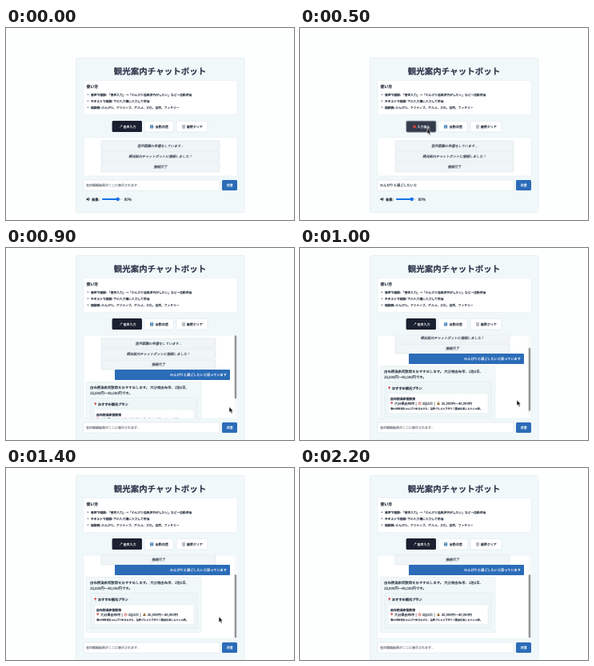
An HTML page that plays this animation: 360 px wide and 240 px high, repeating every 2300 ms.

```html
<!DOCTYPE html>
<html lang="ja">
<head>
<meta charset="utf-8">
<title>観光案内チャットボット</title>
<style>
html, body { margin: 0; width: 100%; height: 100%; overflow: hidden; background: #fdfefe; }
svg { display: block; width: 360px; height: 240px; }
/* The hairline stroke gives the small type its medium weight */
text {
  font-family: "Noto Sans CJK JP", "Noto Sans CJK", "Noto Sans", sans-serif;
  font-size: 4.2px; color: #27303f; fill: currentColor; stroke: currentColor; stroke-width: .14;
  text-rendering: geometricPrecision; white-space: pre;
}
.b { font-weight: 700; }
.title { font-size: 10.5px; color: #2a3347; }
.white { color: #fff; }
.mid { text-anchor: middle; }
.end { text-anchor: end; }
.small text { font-size: 3.78px; }
.btn text { font-size: 4px; }
.field text { font-size: 4.2px; }
.field .hint { font-size: 4px; color: #737a83; }
.card { fill: #fff; stroke: #e1eaee; stroke-width: .5; }
.edge { stroke: #d3dce2; }
.blue { fill: #2b6cb8; }
.sys rect { fill: #f0f5f7; stroke: #d3dde2; stroke-width: .5; }
.sys text { font-style: italic; color: #414b5a; text-anchor: middle; }

/* One loop is 23 steps of 100 ms */
.a { animation: 2.3s step-end infinite; }
.page { animation-name: page; }
.foot { animation-name: foot; }
.panel { animation-name: panel; }
.box { animation-name: box; }
.scroll { animation-name: scroll; }
.thumb { animation-name: thumb; }
.sys rect.a { animation-name: narrow; }
.sys text.a { animation-name: nudge; }
.reply { animation-name: reply; }
.idle { animation-name: idle; }
.rec { animation-name: rec; }
.glow { animation-name: glow; }
.hint { animation-name: hint; }
.say1 { animation-name: say1; }
.say2 { animation-name: say2; }
.say3 { animation-name: say3; }
.say4 { animation-name: say4; }
.send { animation-name: send; }
.pointer { animation-name: pointer; }

@keyframes page { 0% { transform: none; } 39.13%, 100% { transform: translateY(-28px); } }
@keyframes foot { 0% { transform: none; } 39.13%, 100% { transform: translateY(28px); } }
@keyframes panel { 0% { height: 193px; } 39.13%, 100% { height: 249px; } }
@keyframes box { 0% { height: 48px; } 39.13%, 100% { height: 104px; } }
@keyframes scroll {
  0% { transform: none; }
  43.47% { transform: translateY(-20px); }
  47.82%, 100% { transform: translateY(-31px); }
}
@keyframes thumb {
  0% { transform: none; }
  43.47% { transform: translateY(15.5px); }
  47.82%, 100% { transform: translateY(24px); }
}
@keyframes narrow { 0% { width: 148px; } 39.13%, 100% { width: 143px; } }
@keyframes nudge { 0% { transform: none; } 39.13%, 100% { transform: translateX(-2.5px); } }
@keyframes reply { 0% { visibility: hidden; } 39.13%, 100% { visibility: visible; } }
@keyframes idle {
  0% { visibility: visible; }
  13.04% { visibility: hidden; }
  39.13%, 100% { visibility: visible; }
}
@keyframes rec {
  0% { visibility: hidden; }
  13.04% { visibility: visible; }
  39.13%, 100% { visibility: hidden; }
}
@keyframes glow { 0% { fill: #343c4a; } 30.43%, 100% { fill: #464e5c; } }
@keyframes hint {
  0% { visibility: visible; }
  17.39% { visibility: hidden; }
  39.13%, 100% { visibility: visible; }
}
@keyframes say1 { 0% { visibility: hidden; } 17.39% { visibility: visible; } 21.73%, 100% { visibility: hidden; } }
@keyframes say2 { 0% { visibility: hidden; } 21.73% { visibility: visible; } 26.08%, 100% { visibility: hidden; } }
@keyframes say3 { 0% { visibility: hidden; } 26.08% { visibility: visible; } 30.43%, 100% { visibility: hidden; } }
@keyframes say4 { 0% { visibility: hidden; } 30.43% { visibility: visible; } 39.13%, 100% { visibility: hidden; } }
@keyframes send { 0% { fill: #2b6cb8; } 34.78% { fill: #24477a; } 39.13%, 100% { fill: #2b6cb8; } }
@keyframes pointer {
  0% { visibility: hidden; transform: translate(159px, 125.5px); }
  8.69% { visibility: visible; transform: translate(159px, 125.5px); }
  30.43% { visibility: visible; transform: translate(226px, 166px); }
  34.78% { visibility: visible; transform: translate(279px, 198.5px); }
  43.47% { visibility: visible; transform: translate(271px, 190px); }
  47.82% { visibility: visible; transform: translate(266px, 185.7px); }
  86.95%, 100% { visibility: hidden; transform: translate(266px, 185.7px); }
}
</style>
</head>
<body>
<svg viewBox="0 0 360 240">
  <defs>
    <clipPath id="view"><rect x="97" y="137" width="192" height="104"/></clipPath>
    <g id="pin">
      <path d="M1.7 1.5V4.2" stroke="#8a949e" stroke-width=".6"/>
      <circle cx="1.7" cy="1.4" r="1.2" fill="#d63a3a"/>
    </g>
  </defs>

  <g class="a page">
    <rect class="a panel" x="87.5" y="37.5" width="210.5" height="193" rx="2" fill="#f1f8fa" stroke="#e0eaed" stroke-width=".6"/>
    <text class="b mid title" x="192.5" y="57.9">観光案内チャットボット</text>

    <rect class="card" x="97" y="65.5" width="192" height="43" rx="1.5"/>
    <text class="b" x="100.5" y="75" style="font-size:4.9px">使い方</text>
    <g class="small">
      <g fill="#27303f">
        <circle cx="102.4" cy="83.2" r=".65"/>
        <circle cx="102.4" cy="91.2" r=".65"/>
        <circle cx="102.4" cy="99.2" r=".65"/>
      </g>
      <text x="106" y="84.6"><tspan class="b">音声で相談:</tspan> 「音声入力」→「のんびり温泉旅行がしたい」など→自動送信</text>
      <text x="106" y="92.6"><tspan class="b">テキストで相談:</tspan> 下の入力欄に入力して送信</text>
      <text x="106" y="100.6"><tspan class="b">相談例:</tspan> のんびり、アクティブ、グルメ、文化、自然、ファミリー</text>
    </g>

    <g class="btn">
      <g class="a idle">
        <rect x="132.6" y="116" width="37.4" height="14" rx="1.5" fill="#1a2030"/>
        <path d="M142 125L144 122.7" stroke="#8f8aa0" stroke-width=".8"/>
        <circle cx="144.4" cy="122.2" r=".9" fill="#c3b8c8"/>
        <text class="white" x="146.4" y="124.7">音声入力</text>
      </g>
      <g class="a rec">
        <rect class="a glow" x="132.8" y="116.2" width="37.2" height="14" rx="1.6" stroke="#8b97a6" stroke-width=".8"/>
        <circle cx="143.2" cy="123.3" r="1.9" fill="#d8423f"/>
        <text class="white" x="146.4" y="124.7">入力停止</text>
      </g>
      <rect class="card edge" x="173" y="116.3" width="36.5" height="13.7" rx="1.5"/>
      <rect x="180" y="121.2" width="4.2" height="4.2" rx=".6" fill="#4381b5"/>
      <path d="M181 123a1.1 1.1 0 0 1 2.1-.2M183.2 123.7a1.1 1.1 0 0 1-2.1.2" fill="none" stroke="#fff" stroke-width=".5"/>
      <text x="186.7" y="124.7">自動送信</text>
      <rect class="card edge" x="213" y="116.3" width="39" height="13.7" rx="1.5"/>
      <path d="M220.3 121.5h3.6l-.5 3.9h-2.6zM221.5 122v3M222.7 122v3" fill="#edf0f2" stroke="#77818b" stroke-width=".5"/>
      <text x="225.8" y="124.7">履歴クリア</text>
    </g>

    <rect class="a box card" x="97" y="137" width="192" height="48" rx="1.5"/>
    <g clip-path="url(#view)">
      <g class="a scroll">
        <g class="sys">
          <rect class="a" x="119" y="141" width="148" height="11.8" rx="1"/>
          <text class="a" x="193" y="148.6">音声認識の準備をしています...</text>
          <rect class="a" x="119" y="154.5" width="148" height="11.8" rx="1"/>
          <text class="a" x="193" y="161.9">観光案内チャットボットに接続しました！</text>
          <rect class="a" x="119" y="168" width="148" height="11.8" rx="1"/>
          <text class="a" x="193" y="175.2">接続完了</text>
        </g>
        <g class="a reply">
          <rect class="blue" x="136" y="180" width="144" height="13" rx="1"/>
          <text class="white end" x="276" y="187.9">のんびりと過ごしたいと思っています</text>
          <rect x="100" y="195.5" width="144" height="69" rx="1" fill="#f1f8f9" stroke="#e0e9ec" stroke-width=".5"/>
          <g style="font-size:4.4px">
            <text x="105" y="203.7" style="font-size:inherit">由布院温泉街散策をおすすめします。 大分県由布市、2泊3日、</text>
            <text x="105" y="210.5" style="font-size:inherit">25,000円〜40,000円です。</text>
          </g>
          <rect x="106" y="215.5" width="133" height="44" rx="1" fill="#eef6f8" stroke="#d9e5e9" stroke-width=".5"/>
          <use href="#pin" x="110" y="221"/>
          <text class="b" x="115" y="224.6">おすすめ観光プラン</text>
          <rect class="card" x="110.5" y="230" width="124.5" height="24.5" rx="1"/>
          <text class="b" x="113" y="237.5" style="font-size:3.9px">由布院温泉街散策</text>
          <use href="#pin" x="113" y="240"/>
          <text x="118" y="243.8">大分県由布市</text>
          <text x="144.6" y="243.8">|</text>
          <circle cx="149.5" cy="242.3" r="1.6" fill="#fff" stroke="#d0504a" stroke-width=".8"/>
          <path d="M149.5 241.3v1.1h.7" fill="none" stroke="#444" stroke-width=".4"/>
          <text x="152.8" y="243.8">2泊3日</text>
          <text x="167.6" y="243.8">|</text>
          <path d="M172.2 240.3h1.6l-.3 1q1.4 1 1.2 2.7h-3.4q-.2-1.7 1.2-2.7z" fill="#97703c"/>
          <text x="176.8" y="243.8">25,000円〜40,000円</text>
          <text x="113" y="250.2" style="font-size:3.12px">湯の坪街道をのんびり歩きながら、温泉グルメと手作り工芸品を楽しむ大人の旅。</text>
        </g>
      </g>
      <g class="a reply">
        <rect x="284.5" y="137" width="4.3" height="104" fill="#f9fafa"/>
        <rect class="a thumb" x="285.7" y="137.3" width="2.5" height="79" rx="1.2" fill="#959595"/>
      </g>
    </g>
  </g>

  <g class="a foot">
    <rect class="card edge" x="97" y="190" width="170" height="13.2" rx="1.5"/>
    <g class="field">
      <text class="a hint" x="100" y="198.1">音声認識結果がここに表示されます...</text>
      <text class="a say1" x="100" y="198.1">のんびりと</text>
      <text class="a say2" x="100" y="198.1">のんびりと過ごしたいと</text>
      <text class="a say3" x="100" y="198.1">のんびりと過ごしたいと思って</text>
      <text class="a say4" x="100" y="198.1">のんびりと過ごしたいと思っています</text>
    </g>
    <rect class="a send" x="270" y="190" width="19" height="13" rx="1.5"/>
    <text class="white mid" x="279.6" y="198" style="font-size:4px">送信</text>

    <path d="M100.5 213h1.3l1.7-1.5v5l-1.7-1.5h-1.3z" fill="#3b424c"/>
    <path d="M104.3 212.7q.9 1.3 0 2.6" fill="none" stroke="#3b424c" stroke-width=".6"/>
    <text class="b" x="107" y="215.7">音量:</text>
    <rect x="120" y="213.1" width="25" height="1.9" rx=".95" fill="#d9dee2"/>
    <rect x="120" y="213.1" width="20" height="1.9" rx=".95" fill="#1673e6"/>
    <circle cx="139.8" cy="214" r="2.2" fill="#1673e6"/>
    <text x="147.7" y="215.8" style="font-size:4.6px">80%</text>
  </g>

  <path class="a pointer" d="M0 0V7.2L1.7 5.7L2.9 8.5L4.2 7.9L3 5.2H5.2Z" fill="#111" stroke="#fff" stroke-width=".6" stroke-linejoin="round"/>
</svg>
</body>
</html>
```
